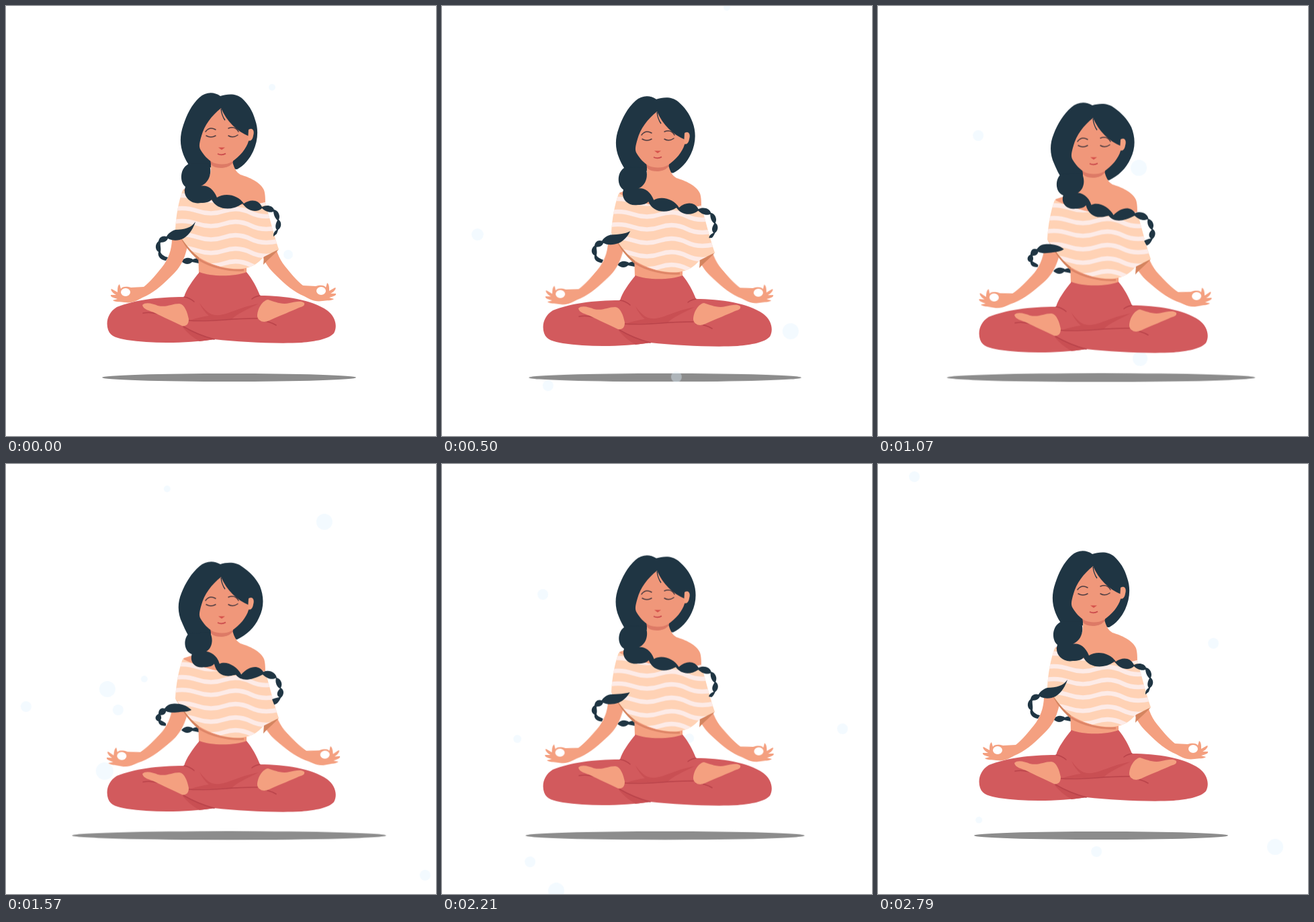
These frames come from a looping animation (640x640 px, 2.87 s). An HTML page without scripts:

```html
<!DOCTYPE html>
<html lang="en">
<head>
<meta charset="utf-8">
<title>Floating meditation</title>
<style>
  html, body { margin: 0; height: 100%; overflow: hidden; background: #fff; }
  svg { display: block; width: 100vw; height: 100vh; }

  /* Half a breath; every part shares this clock. */
  .shadow, .body, .arm, .hair, .braid, .tail {
    animation: 1435ms cubic-bezier(.37, 0, .63, 1) -30ms infinite alternate;
  }
  .shadow { fill: #8c8c8c; transform-origin: 332px 553px; animation-name: spread; }
  .body { animation-name: sink; }
  .arm { transform-origin: 268px 352px; animation-name: open; }
  .hair { animation-name: hair; }
  .braid { animation-name: braid; }
  .tail { animation-name: tail; }

  .dark { fill: #1f3543; }
  .skin { fill: #f4a080; }
  .face { fill: #f0977a; }
  .shade { fill: #d4845f; }
  .pants { fill: #d25a5d; }
  .fold { fill: #c94f53; }
  .crease { fill: none; stroke: #b9434a; stroke-width: 1.5; stroke-linecap: round; }
  .lash { fill: none; stroke: #4a3b40; stroke-width: 1.5; stroke-linecap: round; }

  .bubbles circle {
    fill: #e0f2ff; fill-opacity: .4;
    animation: drift 2870ms linear var(--start, 0ms) infinite;
  }

  @keyframes spread { to { transform: scale(1.245, 1.1); } }
  @keyframes sink { to { transform: translateY(16.7px); } }
  @keyframes open { to { transform: rotate(4.8deg); } }
  @keyframes drift {
    0% { opacity: 1; transform: translate(calc(-1 * var(--dx, 0px)), calc(-1 * var(--dy, 0px))); }
    9.75% { opacity: 1; transform: translate(calc(.4 * var(--dx, 0px)), calc(.4 * var(--dy, 0px))); }
    9.76%, 100% { opacity: 0; }
  }
  @keyframes hair {
    to { d: path("M319 133C309 127 297 128 288 136C276 146 267 161 261 176C255 190 255 206 262 220C266 229 268 234 272 240L300 240L344 245C358 238 370 228 377 212C385 196 384 180 378 165C371 152 362 144 352 137C342 129 329 130 319 133Z"); }
  }
  @keyframes braid {
    to { d: path("M272 236C264 244 264 262 277 267C273 278 282 288 294 286C302 286 308 284 310 281C313 294 322 301 335 299C339 298 341 298 342 298C350 308 364 306 382 297C390 304 396 305 402 302C400 310 404 316 408 318C402 324 403 329 407 331C400 332 396 334 396 334L399 342C404 342 407 336 409 332C414 328 415 320 409 317C413 310 408 303 403 302C402 294 392 289 383 293C376 282 362 284 350 297C344 285 328 276 318 281C314 266 300 262 298 263C308 258 309 242 303 234Z"); }
  }
  @keyframes tail {
    to { d: path("M276 351C268 343 258 340 248 341C242 341 238 345 236 348C230 346 227 350 227 356C221 359 221 365 227 367C227 372 232 374 238 373L238 370C235 367 231 366 230 365C232 362 231 359 230 358C235 358 238 355 238 352C244 355 252 354 260 353C266 353 272 353 276 351Z"); }
  }
</style>
</head>
<body>
<svg viewBox="0 0 640 640" xmlns="http://www.w3.org/2000/svg">
  <defs>
    <g id="arm">
      <path class="skin" d="M247 346C247 363 241 378 232 389C224 399 214 411 205 418L186 419C180 417 173 417 171 421L169 414C166 416 166 421 166 426L157 421C155 422 158 427 164 430L156 430C155 433 160 434 166 436L159 438C162 441 170 440 176 441C188 443 196 438 203 434C218 428 232 416 245 403C258 391 265 380 270 358L270 340Z"/>
      <ellipse cx="178" cy="426" rx="7" ry="6" fill="#fff"/>
    </g>
    <path id="blouse" d="M263 274C257 290 253 312 252 333L262 347C270 358 278 367 287 374C304 385 330 393 352 391C366 389 374 384 384 373L406 362C400 345 394 322 386 292C350 302 300 292 263 274Z"/>
    <clipPath id="cloth"><use href="#blouse"/></clipPath>
    <path id="stripe" d="M245 284q20-5 40 2t40 0t40 3t50 0"/>
  </defs>

  <ellipse class="shadow" cx="332" cy="553" rx="189" ry="6"/>

  <g class="bubbles">
    <g>
      <circle cx="396" cy="121" r="5"/><circle cx="420" cy="370" r="7"/>
    </g>
    <g style="--start:-2570ms; --dx:-30px; --dy:20px">
      <circle cx="53" cy="340" r="9"/><circle cx="519" cy="484" r="12"/><circle cx="158" cy="565" r="8"/>
      <circle cx="424" cy="2" r="5"/><circle cx="349" cy="552" r="8"/>
    </g>
    <g style="--start:-2000ms; --dx:25px; --dy:-30px">
      <circle cx="149" cy="193" r="8"/><circle cx="388" cy="241" r="12"/><circle cx="390" cy="525" r="11"/>
    </g>
    <g style="--start:-1500ms; --dx:-35px; --dy:8px">
      <circle cx="240" cy="37" r="5"/><circle cx="474" cy="86" r="12"/><circle cx="151" cy="335" r="12"/>
      <circle cx="206" cy="320" r="5"/><circle cx="167" cy="366" r="8"/><circle cx="30" cy="361" r="8"/>
      <circle cx="147" cy="457" r="13"/><circle cx="624" cy="612" r="8"/>
    </g>
    <g style="--start:-1210ms; --dx:-35px; --dy:8px">
      <circle cx="246" cy="102" r="5"/><circle cx="383" cy="187" r="10"/><circle cx="115" cy="311" r="9"/>
      <circle cx="147" cy="341" r="5"/><circle cx="97" cy="464" r="12"/><circle cx="37" cy="552" r="12"/>
      <circle cx="8" cy="629" r="9"/><circle cx="242" cy="427" r="8"/><circle cx="638" cy="517" r="7"/>
    </g>
    <g style="--start:-860ms; --dx:20px; --dy:30px">
      <circle cx="150" cy="194" r="8"/><circle cx="112" cy="409" r="6"/><circle cx="596" cy="394" r="8"/>
      <circle cx="131" cy="592" r="8"/><circle cx="170" cy="635" r="12"/><circle cx="368" cy="408" r="7"/>
    </g>
    <g style="--start:-280ms; --dx:30px; --dy:-20px">
      <circle cx="54" cy="19" r="8"/><circle cx="499" cy="267" r="8"/><circle cx="150" cy="530" r="5"/>
      <circle cx="325" cy="577" r="8"/><circle cx="591" cy="570" r="12"/>
    </g>
  </g>

  <g class="body">
    <path class="dark hair" d="M319 134C309 127 297 128 288 136C276 147 269 162 264 177C258 194 259 208 264 221C267 229 270 233 273 238L300 240L344 243C354 238 363 227 368 216C375 200 376 184 371 170C367 155 360 146 352 138C342 129 329 131 319 134Z"/>
    <path class="dark" d="M261 380C266 373 274 374 278 377L288 374L287 383L277 381C272 386 265 384 261 380Z"/>

    <!-- Neck, shoulders and waist -->
    <path class="skin" d="M305 228L336 228C339 240 342 247 349 251C362 255 379 262 384 274C386 280 386 286 386 300L270 300L264 273C280 268 300 262 304 250C305 244 305 236 305 228ZM286 365L358 380V398L320 406L287 398Z"/>
    <path d="M304 229L338 229C339 236 329 241 320 241C312 241 306 238 305 235Z" fill="#dd7a66"/>
    <path d="M287 377C304 388 332 395 354 393" fill="none" stroke="#de8567" stroke-width="3"/>

    <!-- Legs -->
    <path class="pants" d="M288 396C305 403 340 403 358 396C366 405 374 420 378 431C415 431 455 437 478 453C490 462 494 476 488 487C480 496 460 499 440 501C400 503 350 500 310 496C270 502 220 503 180 497C166 494 156 493 152 482C148 470 152 456 165 448C190 438 225 433 265 433C268 422 278 408 288 396Z"/>
    <path class="fold" d="M288 442C296 452 303 462 318 460C334 458 342 450 376 443C358 452 344 458 336 466L274 468C284 464 294 462 302 461C296 456 291 449 288 442ZM262 476C280 485 295 492 310 496L288 499C280 494 268 486 262 476Z"/>
    <path class="crease" d="M272 468C300 471 340 464 374 465M378 468Q392 469 402 475M204 457Q214 455 225 458M265 433Q273 434 280 440M378 431Q371 432 366 436M264 477Q286 490 310 496"/>
    <path class="skin" d="M203 445C208 440 218 443 226 446C240 449 246 443 258 443C266 444 270 456 272 466C272 474 268 477 262 476C250 470 232 462 222 457C214 453 204 452 203 445ZM444 442C440 438 430 440 422 442C410 445 400 440 390 437C382 438 374 450 374 462C376 470 384 472 392 468C410 460 425 454 436 449C442 447 445 446 444 442Z"/>

    <use class="arm" href="#arm"/>
    <g transform="translate(647 -2) scale(-1 1)"><use class="arm" href="#arm"/></g>

    <!-- Blouse -->
    <path class="shade" d="M252 333L262 349C268 360 278 371 286 378L288 373C275 362 268 350 262 343ZM406 362L384 372L383 385C391 376 399 370 406 362Z"/>
    <use href="#blouse" fill="#ffd2b5"/>
    <g clip-path="url(#cloth)" fill="none" stroke="#fdebe7" stroke-width="6.5">
      <use href="#stripe"/>
      <use href="#stripe" y="19"/>
      <use href="#stripe" y="38"/>
      <use href="#stripe" y="58"/>
      <use href="#stripe" y="78"/>
      <use href="#stripe" y="97"/>
    </g>

    <!-- Face -->
    <path class="face" d="M320 152C306 163 295 178 291 193C288 203 287 208 289 213C294 222 301 229 308 233C315 236 328 237 336 232C348 224 358 212 361 201L362 194C343 186 329 172 320 152Z"/>
    <path class="skin" d="M361 184C368 180 370 187 368 193C367 199 364 202 360 200Z"/>
    <path class="lash" d="M297 187Q303 179 312 184M331 182Q341 178 346 187M298 193Q305 197 312 193M331 193Q338 197 345 192"/>
    <path d="M320 153Q321 163 326 170" fill="none" stroke="#1f3543" stroke-width="1.3"/>
    <path d="M316 210.500H326L321 214Z" fill="#d6504a"/>
    <path d="M315 220Q321 223 327 219.500" fill="none" stroke="#c9474a" stroke-width="1.7"/>

    <path class="dark braid" d="M274 234C258 240 258 262 267 269C262 282 274 296 290 293C298 293 304 291 306 288C312 300 326 304 340 300C347 298 350 295 352 294C360 306 374 308 381 301C388 308 396 307 398 306C399 314 402 317 404 319C400 326 401 331 403 333C398 336 398 340 398 343L403 339C404 336 405 334 405 333C410 330 411 322 406 318C409 312 405 304 399 303C397 297 388 295 381 299C376 288 364 287 354 294C346 281 326 277 314 285C308 270 298 266 290 268C304 262 307 246 302 234Z"/>
    <path class="dark tail" d="M282 321C276 330 266 333 252 333C246 335 241 339 239 343C233 341 228 344 227 350C222 354 221 362 227 366C225 372 230 378 238 379L241 374C236 373 231 370 230 366C231 360 229 355 230 352C236 352 240 349 241 346C248 350 258 349 264 346C274 340 279 330 282 321Z"/>
  </g>
</svg>
</body>
</html>
```
